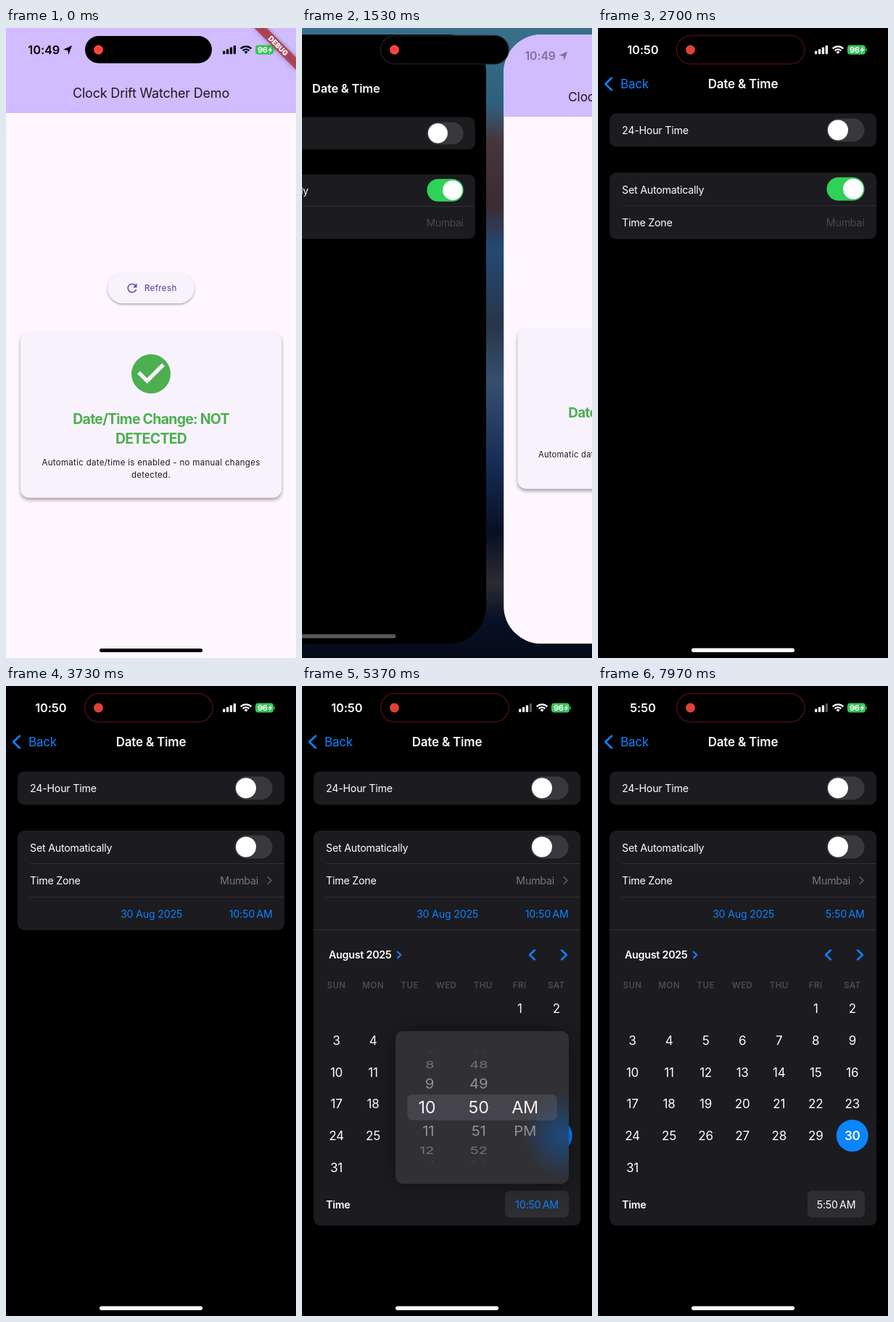
Recreate the animation shown at these times as an HTML page with a canvas. Size 400 px wide and 867 px high, loop 8 s.

```html
<!DOCTYPE html>
<html lang="en">
<head>
<meta charset="utf-8">
<title>Date and time settings</title>
<style>
  html, body { margin: 0; width: 100%; height: 100%; overflow: hidden; background: #000; }
  canvas { display: block; width: 400px; height: 867px; }
</style>
</head>
<body>
<canvas id="stage"></canvas>
<script>
const W = 400, H = 867, LOOP = 8000;
const SWIPE_START = 1180, SWIPE_END = 2500;
const BLUE = '#0a84ff', GREEN = '#34c759', CARD = '#1c1b1f', LINE = '#302f34', PAPER = '#f8f2fc';
const canvas = document.getElementById('stage');
const ratio = window.devicePixelRatio || 1;
canvas.width = W * ratio;
canvas.height = H * ratio;
const c = canvas.getContext('2d');

const REFRESH = new Path2D('M17.65 6.35C16.2 4.9 14.21 4 12 4c-4.42 0-7.99 3.58-7.99 8s3.57 8 7.99 8c3.73 0 6.84-2.55 7.73-6h-2.08c-.82 2.33-3.04 4-5.65 4-3.31 0-6-2.69-6-6s2.69-6 6-6c1.66 0 3.14.69 4.22 1.78L13 11h7V4z');
const CHECK = new Path2D('M10 17l-5-5 1.41-1.41L10 14.17l7.59-7.59L19 8z');
const ARROW = new Path2D('M91 24L79 29.8L85.2 30.8L86.2 37z');
const BOLT = new Path2D('M366 25.5L361.5 31H364L363 35L367.5 29.3H365z');

const lerp = (a, b, k) => a + (b - a) * k;
const ramp = (t, from, to) => {
  const k = Math.min(1, Math.max(0, (t - from) / (to - from)));
  return k * k * (3 - 2 * k);
};
// Remaining distance of a slightly underdamped spring: 1 at the start, then 0.
const spring = z => z <= 0 ? 1
  : Math.exp(-.8 * z) * (Math.cos(.6 * z) + 4 / 3 * Math.sin(.6 * z));

function group(draw, alpha = 1) {
  c.save();
  c.globalAlpha *= alpha;
  draw();
  c.restore();
}
function box(x, y, w, h, r, fill) {
  c.beginPath();
  c.roundRect(x, y, w, h, r);
  c.fillStyle = fill;
  c.fill();
}
function disc(x, y, r, fill) {
  c.beginPath();
  c.arc(x, y, r, 0, 7);
  c.fillStyle = fill;
  c.fill();
}
function shadow(color, blur, dy) {
  c.shadowColor = color;
  c.shadowBlur = blur * ratio;
  c.shadowOffsetY = dy * ratio;
}
// y is the middle of the capitals.
function text(str, x, y, size, fill, { weight = 400, align = 'left', gap = -.2 } = {}) {
  c.font = `${weight} ${size}px Inter, sans-serif`;
  c.letterSpacing = gap + 'px';
  c.textAlign = align;
  c.fillStyle = fill;
  c.fillText(str, x, y + size * .364);
}
const label = (str, x, y, fill = '#fff', style) => text(str, x, y, 14.2, fill, style);
// Positive w points right.
function chevron(x, y, w, h, lineWidth, color) {
  c.beginPath();
  c.moveTo(x - w / 2, y - h / 2);
  c.lineTo(x + w / 2, y);
  c.lineTo(x - w / 2, y + h / 2);
  c.lineWidth = lineWidth;
  c.lineCap = c.lineJoin = 'round';
  c.strokeStyle = color;
  c.stroke();
}

function statusBar(color, time, located, bars) {
  text(time, located ? 52.3 : 61.8, 30, 16.4, color, { weight: 600, align: 'center', gap: -.1 });
  c.fillStyle = color;
  if (located) c.fill(ARROW);
  for (let i = 0; i < 4; i++) {
    const h = 4.5 + i * 2.5;
    group(() => box(299 + i * 4.9, 36 - h, 3.3, h, 1, color), i < bars ? 1 : .35);
  }
  c.strokeStyle = color;
  c.lineCap = 'butt';
  for (const [r, width] of [[1.8, 3.6], [6.2, 2.3], [10.3, 2.3]]) {
    c.beginPath();
    c.arc(331, 35.6, r, -Math.PI * .75, -Math.PI * .25);
    c.lineWidth = width;
    c.stroke();
  }
  box(344, 23.5, 25, 13, 4, GREEN);
  box(369.6, 28, 1.4, 4, .7, GREEN);
  text('96', 347, 30, 11, '#fff', { weight: 700, gap: -.3 });
  c.fillStyle = '#fff';
  c.fill(BOLT);
}

function debugBanner() {
  c.translate(W, 0);
  c.rotate(Math.PI / 4);
  group(() => {
    shadow('rgba(0,0,0,.5)', 6, 0);
    box(-41, 28.5, 82, 12.2, 0, 'rgba(183,28,28,.63)');
  });
  text('DEBUG', 0, 34.6, 9.8, '#fff', { weight: 900, align: 'center', gap: 0 });
}

function appScreen(fade) {
  box(0, 0, W, H, 0, '#fef7ff');
  box(0, 0, W, 117, 0, '#d0bcff');
  group(() => statusBar('#000', '10:49', true, 4), 1 - .6 * fade);
  text('Clock Drift Watcher Demo', 200, 89, 18, '#1d1b20', { align: 'center' });

  group(() => { shadow('rgba(0,0,0,.35)', 3, 1.5); box(140, 337, 120, 42, 21, PAPER); });
  group(() => {
    c.translate(174, 358);
    c.scale(.82, .82);
    c.translate(-12, -12);
    c.fillStyle = '#6750a4';
    c.fill(REFRESH);
  });
  text('Refresh', 191, 358, 11.5, '#6750a4', { weight: 500, gap: .3 });

  group(() => { shadow('rgba(0,0,0,.36)', 5, 3); box(20, 419, 360, 227.5, 12, PAPER); });
  disc(200, 476, 27, '#4caf50');
  group(() => {
    c.translate(200, 476);
    c.scale(2.7, 2.7);
    c.translate(-12, -12);
    c.fillStyle = PAPER;
    c.fill(CHECK);
  });
  const head = { weight: 700, align: 'center', gap: -.75 };
  text('Date/Time Change: NOT', 200, 538, 19.5, '#4caf50', head);
  text('DETECTED', 200, 564.5, 19.5, '#4caf50', head);
  const body = { align: 'center', gap: .3 };
  text('Automatic date/time is enabled - no manual changes', 200, 598, 11.5, '#1d1b20', body);
  text('detected.', 200, 614.5, 11.5, '#1d1b20', body);
  box(129, 854, 142, 5, 2.5, '#000');
  group(debugBanner);
}

function toggle(y, on) {
  box(315.5, y - 16, 52, 32, 16, '#39393d');
  group(() => box(315.5, y - 16, 52, 32, 16, '#30d158'), on);
  disc(lerp(331, 352, on), y, 14, '#fff');
}

function calendar(t, time) {
  box(16, 335, 368, 1, 0, LINE);
  label('August 2025', 37, 370, '#fff', { weight: 600 });
  chevron(134, 370, 4.5, 8.5, 2, BLUE);
  chevron(317.5, 370, -7, 13, 2.4, BLUE);
  chevron(361.5, 370, 7, 13, 2.4, BLUE);
  const column = i => 47.5 + i * 50.55;
  'SUN MON TUE WED THU FRI SAT'.split(' ').forEach((name, i) =>
    text(name, column(i), 412, 11.5, '#4b4b50', { weight: 600, align: 'center', gap: .5 }));
  for (let day = 1; day <= 31; day++) {
    const cell = day + 4, x = column(cell % 7), y = 444 + Math.floor(cell / 7) * 43.7;
    const chosen = day === 30;
    if (chosen) disc(x, y, 22, BLUE);
    text(day, x, y, 17, '#fff', { weight: chosen ? 600 : 400, align: 'center' });
  }
  label('Time', 33, 713.5, '#fff', { weight: 600 });
  const left = time.startsWith('10') ? 280 : 289;
  box(left, 694.5, 368 - left, 37, 7, '#2e2d32');
  label(time, (left + 368) / 2, 713.5, t > 5040 && t < 7680 ? BLUE : '#fff', { align: 'center' });
}

// One column of the wheel; selected may lie between two values while it turns.
function wheel(selected, valueAt, x, align) {
  const first = Math.round(selected) - 3;
  for (let i = first; i <= first + 6; i++) {
    const value = valueAt(i), d = i - selected, far = Math.abs(d), angle = d * .42;
    if (value === undefined || far > 3.2) continue;
    const near = far < .5;
    group(() => {
      c.translate(near || align !== 'right' ? x : x - 2, 581.5 + 78.5 * Math.sin(angle));
      c.scale(1, Math.max(.1, Math.cos(angle)));
      text(value, 0, 0, near ? 23 : 20, '#f2f2f4', { align });
    }, near ? 1 : Math.max(0, .56 - .055 * d * d));
  }
}

function timePicker(t) {
  const closing = ramp(t, 7540, 7800);
  const size = (1 - spring((t - 5070) * .017)) * (1 - .6 * closing);
  const alpha = ramp(t, 5070, 5190) * (1 - closing);
  if (alpha <= 0) return;
  group(() => {
    c.translate(368, 685);
    c.scale(size, size);
    c.translate(-368, -685);
    group(() => { shadow('rgba(0,0,0,.4)', 40, 0); box(132.5, 478, 235.5, 207, 10, '#313034'); });
    c.beginPath();
    c.roundRect(132.5, 478, 235.5, 207, 10);
    c.clip();
    const glow = c.createRadialGradient(362, 620, 0, 362, 620, 58);
    glow.addColorStop(0, 'rgba(10,100,200,.5)');
    glow.addColorStop(1, 'rgba(10,100,200,0)');
    c.fillStyle = glow;
    c.fillRect(132, 478, 237, 207);
    box(148.5, 564, 203.5, 35, 7, 'rgba(120,120,128,.28)');
    const hour = lerp(10, 5, ramp(t, 5930, 6640));
    wheel(hour, i => (i + 11) % 12 + 1, 187, 'right');
    wheel(50, i => i, 245.5, 'center');
    wheel(0, i => ['AM', 'PM'][i], 308.5, 'center');
  }, alpha);
}

function settingsScreen(t, fade) {
  const manual = ramp(t, 2780, 3000), row = ramp(t, 2950, 3270), open = ramp(t, 3770, 4130);
  const format = changed => (changed ? '5:50' : '10:50');
  const clock = t < 2600 ? '10:49' : format(t > 6950);

  box(0, 0, W, H, 0, '#000');
  group(() => statusBar('#fff', clock, t < 2600, t < 4600 ? 4 : 3), 1 - fade);
  chevron(14.5, 77, -8.5, 16.5, 2.6, BLUE);
  text('Back', 31, 77, 17, BLUE);
  text('Date & Time', 200, 77, 17, '#fff', { weight: 600, align: 'center' });

  box(16, 117.5, 368, 46, 9, CARD);
  label('24-Hour Time', 33, 141);
  toggle(140.5, 0);

  group(() => {
    const height = 91.5 + 45.5 * row + 406.5 * open;
    box(16, 199, 368, height, 9, CARD);
    c.clip();
    label('Set Automatically', 33, 222.5);
    toggle(221.5, 1 - manual);
    box(33, 244, 351, 1, 0, LINE);
    label('Time Zone', 33, 268);
    const grey = lerp(72, 120, manual);
    label('Mumbai', lerp(367.5, 348, manual), 268, `rgb(${grey},${grey},${grey + 4})`, { align: 'right' });
    group(() => chevron(363.5, 267.5, 5, 9.5, 1.7, '#5c5c61'), manual);
    group(() => {
      box(33, 290, 351, 1, 0, LINE);
      label('30 Aug 2025', 158, 313.5, BLUE);
      label(format(t > 6900) + '\u2009AM', 367.5, 313.5, BLUE, { align: 'right' });
    }, row);
    if (open) group(() => calendar(t, format(t > 6690) + '\u2009AM'), open);
  });
  timePicker(t);
  group(() => box(129, 853.5, 142, 5.5, 2.75, '#fff'), 1 - .65 * fade);
}

function wallpaper() {
  const g = c.createLinearGradient(0, 0, 0, H);
  [[0, '#38708a'], [.12, '#2d607c'], [.18, '#47353d'], [.28, '#3d2a33'], [.35, '#234a74'],
   [.47, '#28354a'], [.56, '#36506f'], [.68, '#18305a'], [.8, '#070f26'], [.88, '#2e2b30'],
   [.94, '#071026'], [1, '#040a18']].forEach(stop => g.addColorStop(...stop));
  c.fillStyle = g;
  c.fillRect(0, 0, W, H);
}

function island(t) {
  if (t > SWIPE_START) {
    c.beginPath();
    c.roundRect(108.5, 10.5, 176.5, 39, 19.5);
    c.fillStyle = '#000';
    c.fill();
    c.lineWidth = 1.5;
    c.strokeStyle = t < 1700 ? '#1e1e20' : '#4a0d0f';
    c.stroke();
  } else {
    box(109, 11, 175, 37.5, 18.75, '#000');
  }
  disc(127.5, 30, 6.5, t < 1700 ? '#ff453a' : '#e0403a');
}

function draw(t) {
  c.setTransform(ratio, 0, 0, ratio, 0, 0);
  if (t < SWIPE_START) appScreen(0);
  else if (t > SWIPE_END) settingsScreen(t, 0);
  else {
    // Swipe between the two screens, shrunk a little on the way.
    const lift = ramp(t, SWIPE_START, 1450) * (1 - ramp(t, 1560, 1900));
    const scale = 1 - .033 * lift;
    const left = -424 * spring((t - SWIPE_START) * .0058);
    const place = (x, screen) => group(() => {
      c.translate(x, 9 * lift);
      c.scale(scale, scale);
      c.beginPath();
      c.roundRect(0, 0, W, H, 54);
      c.clip();
      screen();
    });
    wallpaper();
    place(left, () => settingsScreen(t, lift));
    place(left + W * scale + 24, () => appScreen(lift));
  }
  island(t);
}

function frame(now) {
  draw(now % LOOP);
  requestAnimationFrame(frame);
}
draw(0);
requestAnimationFrame(frame);
</script>
</body>
</html>
```
